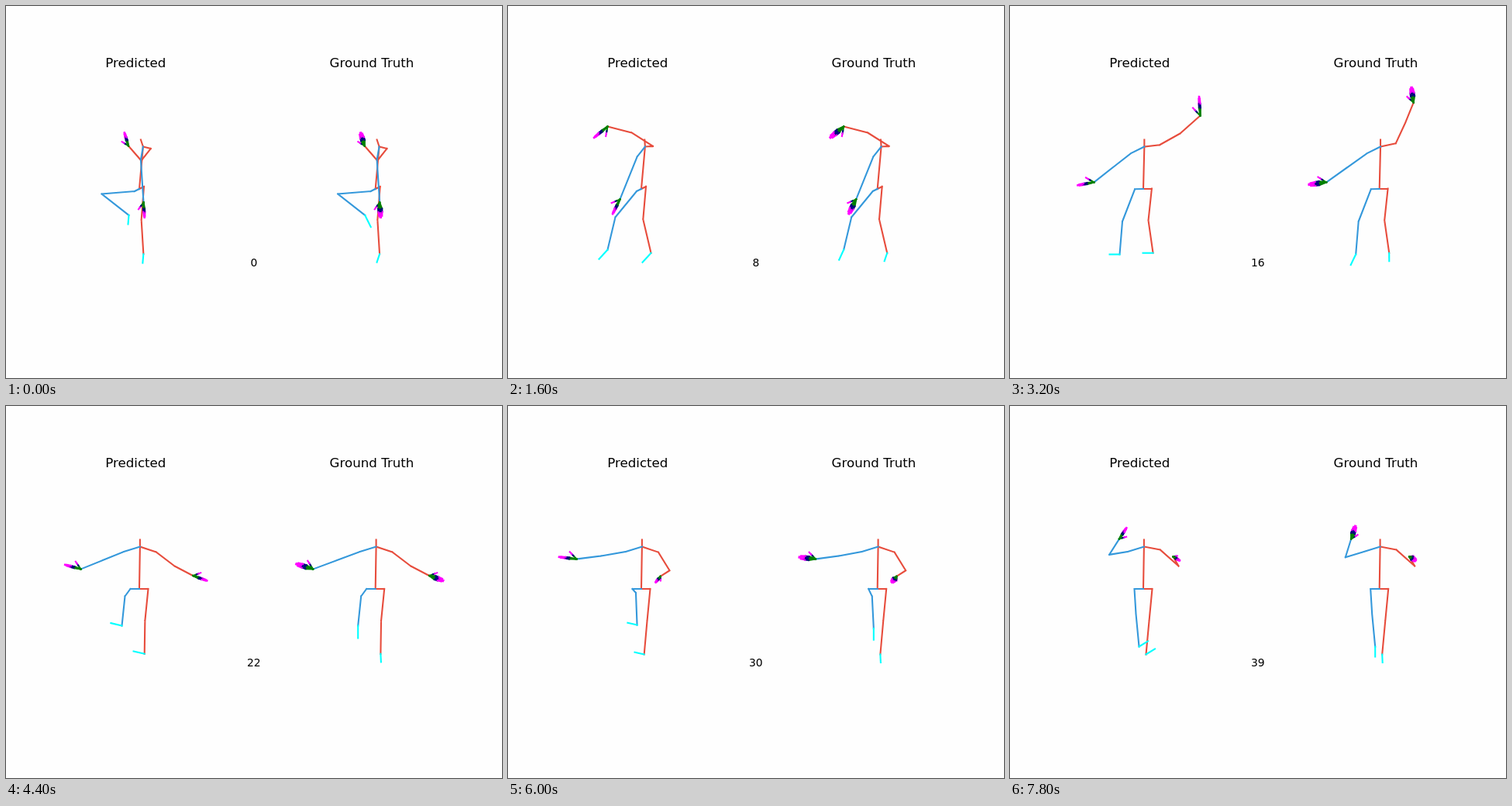
Animation, 640 px wide and 480 px high, one loop 8000 ms. Source, as an HTML page with a canvas:

```html
<!DOCTYPE html>
<html lang="en">
<head>
<meta charset="utf-8">
<title>Pose comparison</title>
<style>
  html, body { margin: 0; width: 100%; height: 100%; overflow: hidden; background: #fefefe; }
  canvas { display: block; }
</style>
</head>
<body>
<canvas id="stage" width="640" height="480"></canvas>
<script>
const STEP = 200, STEPS = 40;
const RED = '#e74c3c', BLUE = '#3498db', CYAN = '#00ffff';
const FINGER = ['#008000', '#000080', '#ff00ff'];
const PELVIS = [171.5, 235.5];
const ctx = document.getElementById('stage').getContext('2d');

// Key poses: step, then values.
// Right arm: elbow, wrist, curl of the hand in degrees.
const rightArmKeys = [
  [0, 174, 199, 157.5, 180, 24], [8, 159, 163, 128, 155, -54], [12, 188, 147, 194, 126, -25],
  [16, 205, 150, 215.5, 124, -30], [17, 219, 164, 245, 141, -52], [20, 224, 188, 259, 187, -15],
  [22, 217, 206, 241, 218.5, -8], [26, 202, 215.5, 195, 222.5, -45], [33, 212.5, 209, 197, 217, 0],
  [39, 217, 206, 210, 194, 150]
];
const leftWristKeys = [
  [0, 177, 253], [8, 144, 249], [16, 103, 227], [22, 91, 210], [26, 90, 205], [33, 93, 191], [39, 135, 171]
];
// Left leg: knee, ankle.
const leftLegKeys = [
  [0, 123, 242, 158, 269.5], [8, 138, 272, 128, 314], [16, 144.5, 277.5, 141, 320],
  [22, 153, 245, 149, 283], [26, 164, 220, 163.5, 262], [33, 165, 264, 169, 305], [39, 162, 268, 166, 310]
];
// Feet: ankle to toe.
const flatFoot = [[0, -1, 11.5], [8, -11, 12], [16, -13, 0], [24, -14.5, -4.5], [33, -11, -2], [39, 11.5, -7]];
const hangingFoot = [[0, 7.5, 15], [8, -6, 13], [16, -6.5, 13.5], [22, 0, 16], [39, 0, 13]];

const ramp = (t, from, to) => Math.min(1, Math.max(0, (t - from) / (to - from)));
const bell = (t, mid, width) => Math.exp(-(((t - mid) / width) ** 2));
const add = (a, b) => [a[0] + b[0], a[1] + b[1]];
const mix = (a, b, k) => a.map((v, i) => v + (b[i] - v) * k);

function sample(keys, t) {
  const next = Math.max(1, keys.findIndex(key => key[0] >= t));
  const a = keys[next - 1], b = keys[next];
  return mix(a, b, ramp(t, a[0], b[0])).slice(1);
}

function bones(color, ...joints) {
  ctx.strokeStyle = color;
  ctx.beginPath();
  for (let i = 1; i < joints.length; i++) {
    ctx.moveTo(...joints[i - 1]);
    ctx.lineTo(...joints[i]);
  }
  ctx.stroke();
}

// The hand continues the forearm, turned by curl; side tells where the thumb is.
function hand(elbow, wrist, curl, width, side) {
  const dx = wrist[0] - elbow[0], dy = wrist[1] - elbow[1];
  const length = 0.72 * Math.hypot(dx, dy);
  const heading = Math.atan2(dy, dx) + curl * Math.PI / 180;
  const finger = (angle, reach, shift) => {
    const c = Math.cos(angle), s = Math.sin(angle);
    const at = (along, across) => add(wrist, [c * along - s * across, s * along + c * across]);
    const joints = [wrist, at(reach * 0.46, shift), at(reach * 0.7, shift), at(reach, shift * 0.8)];
    FINGER.forEach((color, i) => bones(color, joints[i], joints[i + 1]));
  };
  finger(heading + side * 0.7, length * 0.55, 0);
  for (const k of [-1, -0.3, 0.4, 1]) finger(heading, length * (1 - 0.12 * k * k), k * width / 2);
}

function figure(t, { dx, lead, drift, handWidth, feet }) {
  const turn = ramp(t, 8, 17), open = ramp(t, 0, 20);
  const neck = [172.4 + 4 * (1 - turn), 181];
  const head = add(neck, [-3 * (1 - ramp(t, 0, 10)), -9]);
  const hip = [6 + 5.5 * turn, -3 * (1 - turn)];
  const rightHip = add(PELVIS, hip), leftHip = add(PELVIS, [-hip[0], -hip[1]]);

  const [ex, ey, wx, wy, curl] = sample(rightArmKeys, t + lead * bell(t, 16, 3));
  const rightElbow = [ex, ey], rightWrist = [wx, wy];
  const rightShoulder = add(neck, [10 + 11 * turn, 0.12 * (wy - 160)]);

  const wave = Math.cos(2 * Math.PI * ((t - 16) / 23) ** 2);
  const leftShoulder = add(neck, [-3 - 18 * open, 17 - 10.5 * open]);
  const leftWrist = add(sample(leftWristKeys, t), [drift * turn * wave, 0]);
  const lx = leftWrist[0] - leftShoulder[0], ly = leftWrist[1] - leftShoulder[1];
  const bend = 22 * ramp(t, 28, 39) ** 2 / Math.hypot(lx, ly);
  const leftElbow = add(mix(leftShoulder, leftWrist, 0.5), [ly * bend, -lx * bend]);

  const sway = 11 * bell(t, 12, 9);
  const rightAnkle = [175 + sway, 320 - sway / 5];
  const rightKnee = add(mix(rightHip, rightAnkle, 0.5), [-2 * (1 - turn) - 0.55 * sway, -0.5]);
  const [kx, ky, ax, ay] = sample(leftLegKeys, t - 2 * lead * bell(t, 33, 3));
  const leftKnee = [kx, ky], leftAnkle = [ax, ay];
  const [rightFoot, leftFoot] = feet(t, turn);

  ctx.save();
  ctx.translate(dx + 0.5, 0.5);
  bones(RED, head, neck, PELVIS, rightHip, rightKnee, rightAnkle);
  bones(RED, neck, rightShoulder, rightElbow, rightWrist);
  bones(BLUE, PELVIS, leftHip, leftKnee, leftAnkle);
  bones(BLUE, neck, leftShoulder, leftElbow, leftWrist);
  bones(CYAN, rightAnkle, add(rightAnkle, rightFoot));
  bones(CYAN, leftAnkle, add(leftAnkle, leftFoot));
  hand(rightElbow, rightWrist, curl, handWidth, -1);
  hand(leftElbow, leftWrist, 38 * bell(t, 21, 9), handWidth, 1);
  ctx.restore();
}

const predicted = {
  dx: 0, lead: 1, drift: 5.5, handWidth: 2,
  feet: t => [sample(flatFoot, t), sample(flatFoot, t)]
};
const truth = {
  dx: 304.7, lead: 0, drift: 0, handWidth: 5,
  feet: (t, turn) => [[0.5 - 4 * (1 - turn), 10.5], sample(hangingFoot, t)]
};

function label(text, x, y, size) {
  ctx.font = `${size}px "DejaVu Sans", sans-serif`;
  ctx.fillText(text, x, y);
}

function draw(now) {
  const step = Math.floor(now / STEP) % STEPS;
  ctx.fillStyle = '#fefefe';
  ctx.fillRect(0, 0, 640, 480);
  ctx.fillStyle = '#000';
  ctx.textAlign = 'center';
  ctx.lineWidth = 2.08;
  ctx.lineCap = 'square';
  label('Predicted', 167.3, 79, 16.67);
  label('Ground Truth', 472, 79, 16.67);
  label(step, 319.8, 336, 13.89);
  figure(step, predicted);
  figure(step, truth);
}

const start = performance.now();
function tick() {
  draw(performance.now() - start);
  requestAnimationFrame(tick);
}
tick();
</script>
</body>
</html>
```
